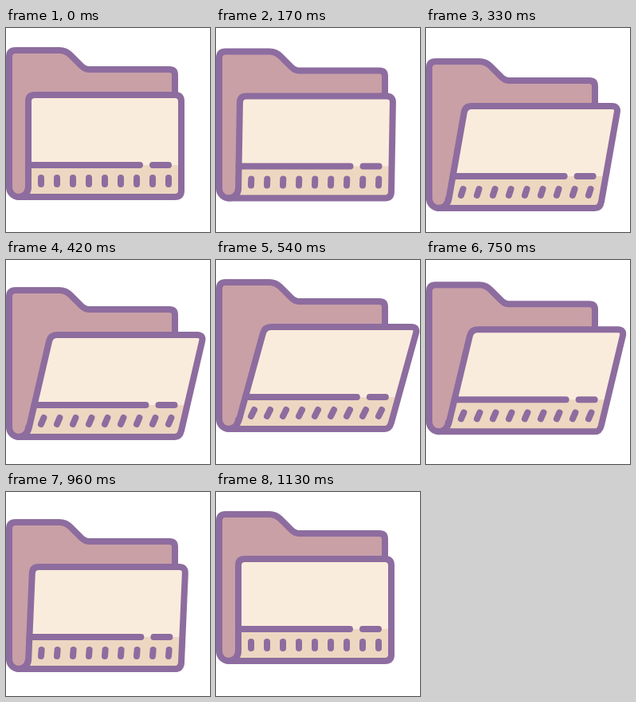
An HTML page for the animation above (1180 ms loop, 256 by 256 pixels).

```html
<!DOCTYPE html>
<html lang="en">
<head>
<meta charset="utf-8">
<title>Folder</title>
<style>
  html, body { margin: 0; height: 100%; overflow: hidden; background: #fff; }
  svg { display: block; width: 100vw; height: 100vh; }
  .line { stroke: #8d6c9f; stroke-width: 8; stroke-linecap: round; stroke-linejoin: round; }
</style>
</head>
<body>
<svg viewBox="0 0 256 256" fill="none">
  <g id="folder">
    <path class="line" fill="#c9a0a6" d="M16 212C9.4 212 4 206.6 4 200V36Q4 28 12 28H67Q75 28 81 34L94 47Q99 52 104 52H205Q212 52 212 59V84L28 200C28 206.6 22.6 212 16 212Z"/>
    <path id="panel" fill="#faecdc"/>
    <path id="band" fill="#eed7c1"/>
    <path id="outline" class="line"/>
    <path id="marks" class="line"/>
  </g>
</svg>
<script>
const LOOP = 1180, STEP = 41.7, HALF = 13;
// [step, value] pairs covering one half of the loop
const LEAN = [[0, 0], [4, 2], [7, 11.5], [8, 20.5], [10, 27], [13, 32]];
const DIP = [[0, 0], [4, 1.5], [7, 9], [8, 14], [9, 14.6], [10, 10], [13, 0]];

const $ = id => document.getElementById(id);
const draw = (id, d) => $(id).setAttribute('d', d);

// Smooth curve through the keys, at rest at both ends
function curve(keys, x) {
  const slope = i => {
    const a = keys[i - 1], b = keys[i + 1];
    return a && b ? (b[1] - a[1]) / (b[0] - a[0]) : 0;
  };
  let i = 0;
  while (i < keys.length - 2 && x > keys[i + 1][0]) i++;
  const [x0, y0] = keys[i], [x1, y1] = keys[i + 1];
  const w = x1 - x0, u = (x - x0) / w, v = 1 - u;
  return v * v * (1 + 2 * u) * y0 + u * u * (3 - 2 * u) * y1
    + w * u * v * (v * slope(i) - u * slope(i + 1));
}

function render(ms) {
  const step = Math.floor((ms % LOOP + 5) / STEP) % 28;
  const opening = step <= HALF;
  const k = opening ? step : Math.min(step - HALF, HALF);
  const swing = curve(LEAN, k);
  const lean = opening ? swing : 32 - swing;
  const p = (x, y) => `${(x + lean * (204 - y) / 116).toFixed(2)} ${y} `;

  const left = `M16 212C22.6 212 ${p(28, 207)}${p(28, 200)}`;
  const right = `L${p(220, 204)}Q${p(220, 212)}212 212`;
  const shape = left + `L${p(28, 92)}Q${p(28, 84)}${p(36, 84)}`
    + `L${p(212, 84)}Q${p(220, 84)}${p(220, 92)}` + right + 'Z';
  draw('panel', shape);
  draw('outline', shape);
  draw('band', left + `L${p(28, 172)}L${p(220, 172)}` + right + 'Z');

  let marks = `M${p(28, 172)}L${p(168, 172)}M${p(184, 172)}L${p(204, 172)}`;
  for (let x = 44; x <= 204; x += 20) marks += `M${x} 196L${x + lean / 8} 188`;
  draw('marks', marks);
  $('folder').setAttribute('transform', `translate(0 ${curve(DIP, k)})`);
}

const start = performance.now();
function tick() {
  render(performance.now() - start);
  requestAnimationFrame(tick);
}
tick();
</script>
</body>
</html>
```
